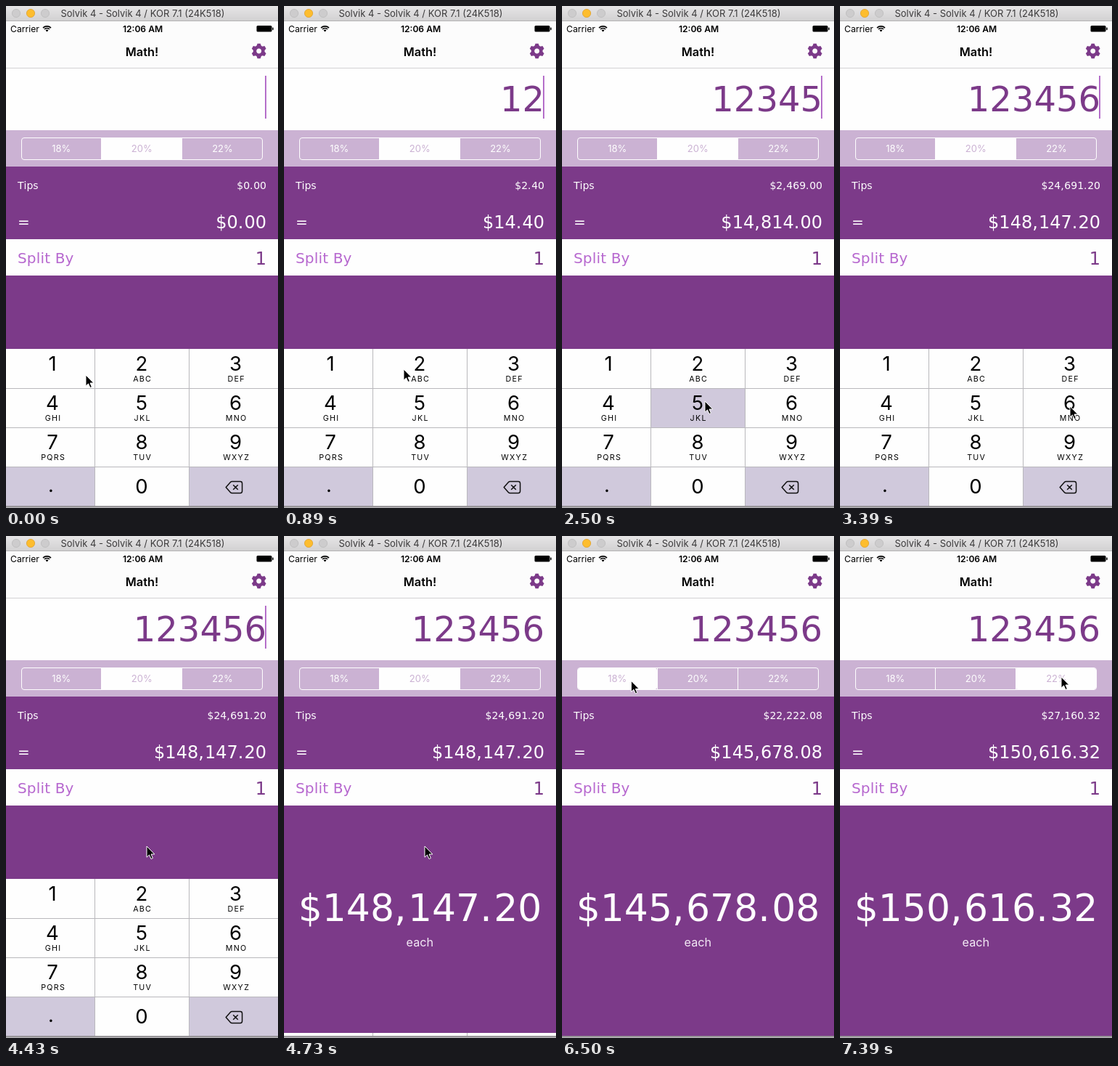
These frames come from a looping animation (375x691 px, 8000 ms). An HTML page:

```html
<!DOCTYPE html>
<html lang="en">
<head>
<meta charset="utf-8">
<title>Tip calculator</title>
<style>
  html, body { margin: 0; width: 100%; height: 100%; overflow: hidden; background: #7c3a89; }
  svg { display: block; width: 100%; height: 100%; cursor: default; }
  text { font-family: Inter, Roboto, sans-serif; white-space: pre; }
  .wide { font-family: "DejaVu Sans", sans-serif; font-kerning: none; }
  .wide .mark { letter-spacing: .046em; }
  .end { text-anchor: end; }
  .mid { text-anchor: middle; }
</style>
</head>
<body>
<svg viewBox="0 0 375 691">
  <defs>
    <linearGradient id="barFill" x2="0" y2="1">
      <stop stop-color="#e6e5e6"/><stop offset="1" stop-color="#d2d1d2"/>
    </linearGradient>
    <linearGradient id="edgeFill" x2="0" y2="1">
      <stop stop-color="#858286"/><stop offset="1" stop-color="#bcbabd"/>
    </linearGradient>
  </defs>

  <rect width="375" height="691" fill="#7c3a89"/>

  <!-- window bar -->
  <rect width="375" height="20" fill="url(#barFill)"/>
  <rect y="20" width="375" height="1" fill="#b3b2b3"/>
  <g stroke-width=".8">
    <circle cx="14" cy="10" r="5.6" fill="#cdcccd" stroke="#bcbbbc"/>
    <circle cx="34" cy="10" r="5.6" fill="#fdbd2e" stroke="#e0a02a"/>
    <circle cx="54" cy="10" r="5.6" fill="#cdcccd" stroke="#bcbbbc"/>
  </g>
  <text class="mid" x="188.5" y="15" font-size="13" fill="#3c3b3c">Solvik 4 - Solvik 4 / KOR 7.1 (24K518)</text>

  <!-- status and navigation -->
  <rect y="21" width="375" height="64" fill="#fcfcfc"/>
  <rect y="85" width="375" height="1" fill="#d3d2d4"/>
  <text x="6" y="35.5" font-size="12.2">Carrier</text>
  <g id="wifi" transform="translate(56.5 35.5)" fill="none" stroke="#000" stroke-width="1.7"></g>
  <text class="mid" x="188.5" y="35.5" font-size="12.1" font-weight="600">12:06 AM</text>
  <rect x="345.5" y="27" width="21" height="8.5" rx="1.6"/>
  <rect x="367.2" y="29.4" width="1.5" height="3.8" rx=".7"/>
  <text class="mid" x="187.5" y="69" font-size="16.3" font-weight="600">Math!</text>
  <g id="gear" transform="translate(348.7 62)" fill="#7c3a89"></g>

  <!-- amount -->
  <rect y="86" width="375" height="85" fill="#fefefe"/>
  <text id="amount" class="wide end" x="359" y="144.6" font-size="48" fill="#7c3a89"></text>
  <rect id="caret" x="357" y="96" width="2" height="59" fill="#b56fca"/>

  <!-- rate -->
  <rect y="171" width="375" height="50" fill="#cbb2d3"/>
  <g id="rates"></g>
  <rect x="21.5" y="181.5" width="332" height="30" rx="3.5" fill="none" stroke="#fefefe"/>

  <!-- results -->
  <g fill="#fefefe">
    <text class="wide" x="16" y="251.5" font-size="14">Tips</text>
    <text id="tip" class="wide end" x="359" y="251.5" font-size="14"></text>
    <text class="wide" x="16" y="303.8" font-size="20">=</text>
    <text id="total" class="wide end" x="359" y="305.5" font-size="24"></text>
    <rect y="321" width="375" height="50"/>
    <text id="each" class="wide mid" x="187.5" y="530" font-size="52"></text>
    <text class="mid" x="187.3" y="564.5" font-size="16.2" fill="#f3eaf5">each</text>
  </g>
  <text class="wide" x="16" y="354" font-size="20" letter-spacing=".16" fill="#b768cf">Split By</text>
  <text class="wide end" x="359" y="355.5" font-size="24" fill="#7c3a89">1</text>

  <g id="pad"></g>
  <rect y="688" width="375" height="3" fill="url(#edgeFill)"/>
  <path id="pointer" d="M0 0V15.2L3.5 11.9 6 17.5 8.4 16.4 6 11H10.8Z" stroke="#fff" stroke-width="1"/>
</svg>

<script>
const LOOP = 8000, STEP = 147.8;
const $ = id => document.getElementById(id);

// Step, x and y of the pointer tip
const path = [
  [0, 110, 508], [1, 86, 500], [3, 86, 500], [5, 165, 500], [6, 165, 500],
  [9, 318, 502], [11, 318, 502], [14, 82, 546], [15, 82, 546], [17, 197, 544],
  [18, 197, 544], [21, 317, 551], [23, 317, 551], [27, 194, 427], [32, 194, 427],
  [38, 71, 200], [43, 71, 200], [48, 305, 194]
];
const typedAt = [2, 5, 10, 14, 17, 22];
const litKeys = { 2: 1, 5: 2, 10: 3, 17: 5, 22: 6 };
const caretFade = { 26: .5, 27: 0, 28: 0, 29: .5 };
const PAD_CLOSE = 32;

const colX = [0, 123, 253, 375];
const colMid = [64, 187, 316.5];
const letters = ['', 'ABC', 'DEF', 'GHI', 'JKL', 'MNO', 'PQRS', 'TUV', 'WXYZ'];
const rateList = [18, 20, 22];
const rateX = [22, 131, 242, 353];

function buildIcons() {
  const arc = r => `M${-r * .7} ${-r * .7}A${r} ${r} 0 0 1 ${r * .7} ${-r * .7}`;
  $('wifi').innerHTML =
    `<path d="${arc(7.8)}${arc(5)}"/><path d="${arc(2.8)}L0 0Z" fill="#000" stroke="none"/>`;

  let teeth = '';
  for (let a = 0; a < 360; a += 60)
    teeth += `<path d="M-3.4-6L-2.1-10.2H2.1L3.4-6Z" transform="rotate(${a})"/>`;
  $('gear').innerHTML = teeth +
    '<circle r="5.7" fill="none" stroke="#7c3a89" stroke-width="4.4"/>';
}

function buildPad() {
  let html = '<rect y="472" width="375" height="216" fill="#fefefe"/>' +
    '<path d="M0 634H122V688H0ZM253 634H375V688H253Z" fill="#d0c9dc"/>';
  for (let i = 0; i < 9; i++) {
    const c = i % 3, y = 472 + 54 * Math.floor(i / 3);
    html += `<rect id="key${i + 1}" x="${colX[c]}" y="${y}" width="${colX[c + 1] - colX[c]}" height="54" fill="#d0c9dc"/>` +
      `<text class="mid" x="${colMid[c]}" y="${y + 30}" font-size="27.5">${i + 1}</text>` +
      `<text class="mid" x="${colMid[c] + 1.2}" y="${y + 45}" font-size="10.7" letter-spacing="1.3">${letters[i]}</text>`;
  }
  html += '<text class="mid" x="187" y="671" font-size="27.5">0</text>' +
    '<text class="mid" x="61.8" y="669" font-size="27">.</text>' +
    '<path d="M122.5 472V688M252.5 472V688M0 526.5H375M0 580.5H375M0 634.5H375" stroke="#b9b8bc"/>' +
    '<path d="M303.2 662.5L309.4 655.6Q310.3 654.6 311.6 654.6H323Q325.6 654.6 325.6 657.2V667.8Q325.6 670.4 323 670.4H311.6Q310.3 670.4 309.4 669.4ZM313.2 659.2L319.8 665.8M319.8 659.2L313.2 665.8" fill="none" stroke="#111" stroke-width="1.5" stroke-linejoin="round"/>';
  $('pad').innerHTML = html;
}

function buildRates() {
  $('rates').innerHTML = rateList.map((r, i) =>
    `<rect id="seg${i}" x="${rateX[i]}" y="182" width="${rateX[i + 1] - rateX[i]}" height="29" rx="${i === 1 ? 0 : 3}"/>` +
    `<text id="rate${i}" class="mid" x="${[76.3, 187.3, 298.5][i]}" y="201" font-size="13">${r}%</text>`
  ).join('') + '<path d="M131.5 182V211M242.5 182V211" stroke="#fefefe"/>';
}

function money(v) {
  const s = '$' + v.toLocaleString('en-US', { minimumFractionDigits: 2, maximumFractionDigits: 2 });
  return s.replace(/[.,]/g, '<tspan class="mark">$&</tspan>');
}

function pointerAt(k) {
  const i = path.findIndex(p => p[0] > k);
  if (i < 0) return path[path.length - 1].slice(1);
  const a = path[i - 1], b = path[i];
  const u = (k - a[0]) / (b[0] - a[0]);
  const e = u * u * (3 - 2 * u);
  return [a[1] + (b[1] - a[1]) * e, a[2] + (b[2] - a[2]) * e];
}

function drawRates(chosen, pressed) {
  rateList.forEach((r, i) => {
    const on = i === chosen, down = i === pressed;
    $('seg' + i).setAttribute('fill', on ? '#fefefe' : down ? '#d6c3dd' : '#cbb2d3');
    $('rate' + i).setAttribute('fill', on ? '#cbb2d3' : down ? '#eee4f1' : '#fefefe');
  });
}

function draw(k) {
  const count = typedAt.filter(n => n <= k).length;
  const digits = '123456'.slice(0, count);
  const chosen = k < 40 ? 1 : k < 49 ? 0 : 2;
  const bill = Number(digits), tip = bill * rateList[chosen] / 100;

  $('amount').textContent = digits;
  $('tip').innerHTML = money(tip);
  $('total').innerHTML = $('each').innerHTML = money(bill + tip);
  $('caret').setAttribute('opacity', k >= PAD_CLOSE ? 0 : caretFade[k] ?? 1);
  drawRates(chosen, k === 39 ? 0 : k === 48 ? 2 : -1);

  for (let n = 1; n <= 9; n++)
    $('key' + n).setAttribute('visibility', litKeys[k] === n ? 'inherit' : 'hidden');
  $('pad').setAttribute('visibility', k > PAD_CLOSE ? 'hidden' : 'visible');
  $('pad').setAttribute('transform', `translate(0 ${k === PAD_CLOSE ? 212 : 0})`);
  $('pointer').setAttribute('transform', `translate(${pointerAt(k)})`);
}

buildIcons();
buildPad();
buildRates();

const start = performance.now();
let shown = -1;
function tick() {
  const t = (performance.now() - start) % LOOP;
  const k = Math.floor((t + 13) / STEP);
  if (k !== shown) draw(shown = k);
  requestAnimationFrame(tick);
}
tick();
</script>
</body>
</html>
```
